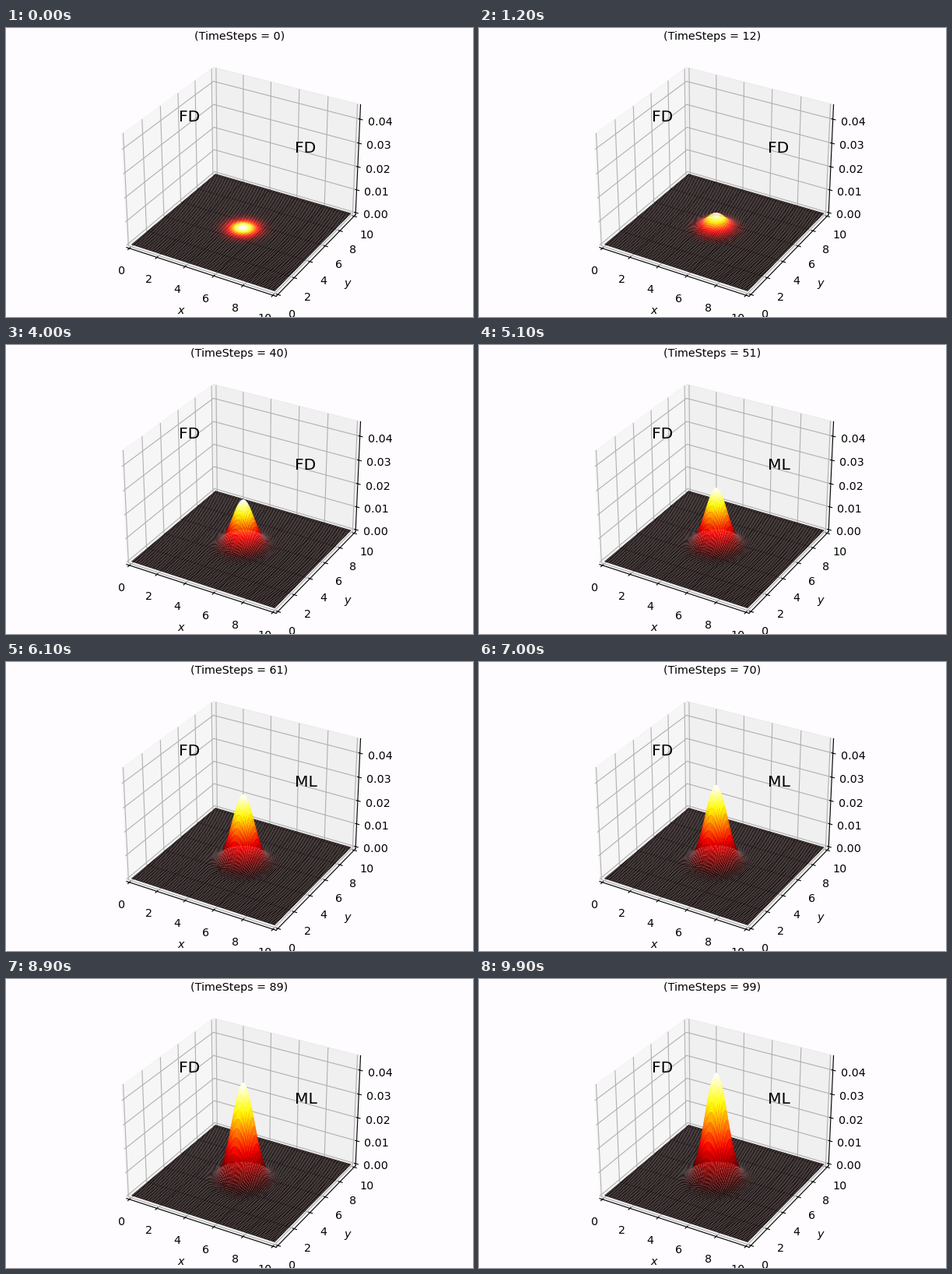
A matplotlib script that plays this animation: 600x371 px, repeating every 10000 ms.

```python
import numpy as np
import matplotlib.pyplot as plt
from matplotlib.animation import FuncAnimation
from mpl_toolkits.mplot3d import proj3d

W, H, DPI = 600, 371, 100
FRAMES = 100
SIZE, LEFT, BOTTOM = 342, 129.1, 5      # square 3D viewport, px
X_MAX, Z_MAX = 10, 0.045
N = 100                                 # cells per side
RATE, TAU, WIDTH2 = 5.1e-4, 355, 0.84   # source strength, spreading time, width
SWITCH = 50                             # step at which the model takes over

plt.rcParams.update({"font.family": "DejaVu Sans", "font.size": 10.25})

fig = plt.figure(figsize=(W / DPI, H / DPI), dpi=DPI, facecolor="#fefcfe")
rect = [LEFT / W, BOTTOM / H, SIZE / W, SIZE / H]
ax = fig.add_axes(rect, projection="3d", facecolor="none")
ax.set_xticks(range(0, 11, 2))
ax.set_yticks(range(0, 11, 2))
ax.set_zticks(np.arange(5) / 100, [f"{v / 100:.2f}" for v in range(5)])
pad = 1 / 48
ax.set_xlim(-X_MAX * pad, X_MAX * (1 + pad))
ax.set_ylim(-X_MAX * pad, X_MAX * (1 + pad))
ax.set_zlim(-Z_MAX * pad, Z_MAX * (1 + pad))
ax.view_init(elev=30, azim=-60)
ax.set_xlabel("$x$", labelpad=4.8)
ax.set_ylabel("$y$", labelpad=4.8)

# Flat layer in projected coordinates, on top of the 3D box
flat = fig.add_axes(rect)
flat.set_xlim(*ax.viewLim.intervalx)
flat.set_ylim(*ax.viewLim.intervaly)
flat.axis("off")
proj = ax.get_proj()

# Rows run from the far side to the near side, so later cells cover earlier ones
line = np.linspace(0, X_MAX, N + 1)
X, Y = np.meshgrid(line, line[::-1])

# Heat from a steady Gaussian source, each pulse spreading as it ages
R2 = (X - X_MAX / 2) ** 2 + (Y - X_MAX / 2) ** 2
spread = 1 + np.arange(FRAMES)[:, None, None] / TAU
heat = np.cumsum(RATE / spread * np.exp(-R2 / (WIDTH2 * spread)), axis=0)


def draw_surface(z):
    px, py, _ = proj3d.proj_transform(X.ravel(), Y.ravel(), z.ravel(), proj)
    mean = (z[1:, 1:] + z[:-1, 1:] + z[1:, :-1] + z[:-1, :-1]) / 4
    # Antialiased cells without edges leave fine seams between them
    return flat.pcolormesh(np.reshape(px, X.shape), np.reshape(py, X.shape),
                           mean, cmap="hot", vmin=0, vmax=mean.max(),
                           shading="flat", antialiased=True, snap=False,
                           edgecolors="face", linewidth=0)


def label(x, y, text, **style):
    return fig.text(x / W, 1 - y / H, text, **style)


title = label(300, 15, "", ha="center")
label(222.2, 120, "FD", size=14.6)
method = label(371, 160, "FD", size=14.6)
state = {"surface": None}


def update(k):
    if state["surface"] is not None:
        state["surface"].remove()
    state["surface"] = draw_surface(heat[k])
    title.set_text(f"(TimeSteps = {k})")
    method.set_text("FD" if k < SWITCH else "ML")
    return state["surface"], title, method


anim = FuncAnimation(fig, update, frames=FRAMES, interval=100,
                     repeat=True, repeat_delay=0, blit=False)
plt.show()
```
